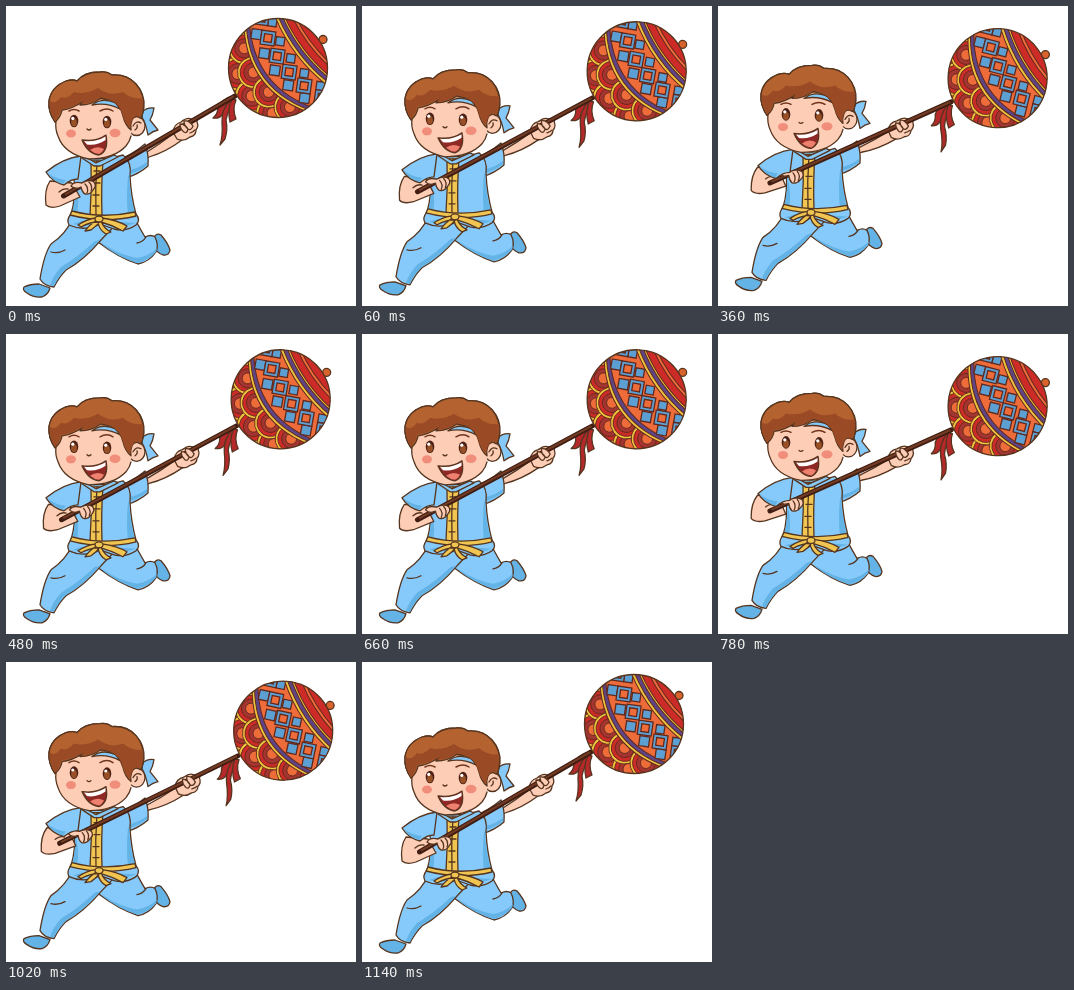
An HTML page for the animation above (1.2 s loop, 350x300 px).

```html
<!DOCTYPE html>
<html lang="en">
<head>
<meta charset="utf-8">
<title>Running boy with a ball on a stick</title>
<style>
  html, body { margin: 0; width: 100%; height: 100%; overflow: hidden; background: #fff; }
  svg { display: block; width: 100vw; height: 100vh; }
  .line { stroke: #55351f; stroke-width: 1.3; stroke-linejoin: round; stroke-linecap: round; }
  .cloth { fill: #86cafb; }
  .shade { fill: #64b3e6; }
  .skin { fill: #fecdb5; }
  .gold { fill: #f0c552; }
  .red { fill: #b5292b; }
  .hair { fill: #b4622f; }
  .none { fill: none; }
</style>
</head>
<body>
<svg viewBox="0 0 350 300" preserveAspectRatio="none">
  <defs><clipPath id="round"><circle r="49.5"/></clipPath></defs>

  <g id="armBack">
    <path class="skin line" d="M132 158 L141 146 Q154 138 168 127 L176 134 Q160 146 143 151Z"/>
    <path class="skin line" d="M167 126 Q168 118 175 116 Q181 111 185 113 Q192 111 191 116 Q193 120 190 124 Q190 130 184 131 Q178 136 171 133Z"/>
  </g>

  <g id="sleeve">
    <path class="cloth line" d="M108 156 Q126 149 139 138 Q143 148 142 160 Q133 168 120 172Z"/>
    <path class="shade" d="M124 168 Q134 165 141 159 L141 156 Q133 162 124 164Z"/>
  </g>

  <g id="body">
    <!-- legs and shoes -->
    <path class="shade line" d="M147 233 Q150 226 155 229 Q162 237 164 244 Q163 250 157 249 Q151 247 147 240Z"/>
    <path class="cloth line" d="M88 214 L130 215 Q136 226 139 231 Q145 228 149 231 Q153 239 150 246 Q143 256 132 258 Q113 252 92 236Z"/>
    <path class="shade" d="M97 238 Q114 249 131 252 Q143 250 151 242 L150 246 Q142 255 131 257 Q112 251 97 239Z"/>
    <path class="shade line" d="M33 278 Q24 278 18 281 Q16 284 21 287 Q28 292 36 291 Q42 289 44 282Z"/>
    <path class="cloth line" d="M67 212 Q60 228 45 238 Q38 248 34 273 Q38 280 48 281 Q53 271 60 264 Q78 254 95 234 L114 214Z"/>
    <path class="shade" d="M48 280 Q53 270 60 263 Q78 253 94 234 L89 235 Q72 251 55 261 Q47 270 44 279Z"/>
    <path class="none line" d="M45 246 Q52 248 59 244 M131 237 Q137 236 140 231"/>

    <!-- shirt -->
    <path class="cloth line" d="M74 150 Q92 156 117 149 Q126 156 124 170 Q125 190 130 208 Q135 214 130 219 Q120 226 108 223 L94 218 Q78 226 63 219 Q60 214 65 208 Q70 192 68 172 L66 158Z"/>
    <path class="shade" d="M122 170 Q120 192 122 209 L129 208 Q124 190 123 170Z M67 218 Q80 222 92 217 L76 215Z M98 217 Q116 223 130 217 L114 216Z"/>
    <path class="shade" d="M69 178 Q74 192 71 208 L66 207 Q70 193 69 178Z"/>
    <path class="gold line" d="M85 155 L97 155 Q95 180 96 210 L84 210 Q86 182 85 155Z"/>
    <path class="none line" d="M91 155 Q89 182 90 210 M88 165h6 M88 177h6 M87 189h6 M87 200h6"/>
    <path class="cloth line" d="M78 150 L90 157 L108 149 L112 151 L94 160 L88 160 L76 152Z"/>

    <!-- sash -->
    <path class="gold line" d="M66 205 Q96 213 129 206 L130 210 Q98 218 64 209Z"/>
    <path class="gold line" d="M90 212 Q81 213 72 219 L75 221 Q84 216 92 216Z M96 212 Q111 214 121 220 L117 225 Q106 219 95 216Z M91 214 Q83 219 79 225 L85 224 Q91 220 94 215Z M95 215 Q98 223 105 226 L100 228 Q93 224 92 216Z"/>
    <ellipse class="gold line" cx="93" cy="213" rx="4" ry="3"/>
  </g>

  <g id="forearm">
    <path class="skin line" d="M44 175 Q38 184 40 199 Q44 203 54 200 L74 191 L66 177Z"/>
    <path class="none line" d="M53 186 Q57 182 62 183"/>
  </g>

  <g id="pole">
    <g id="ribbon">
      <path class="red line" d="M227 90 Q216 93 212 101 Q212 108 207 112 Q213 113 216 109 Q220 101 228 95Z"/>
      <path class="red line" d="M226 92 Q215 103 216 116 Q217 130 214 139 L219 133 Q222 124 220 114 Q222 103 229 95Z"/>
      <path class="red line" d="M226 93 Q221 103 224 116 L230 113 Q226 103 230 94Z"/>
    </g>
    <path d="M57.500 190 L229 90" stroke="#3f1d12" stroke-width="5" stroke-linecap="round"/>
    <path d="M59 188.700 L228 90.200" stroke="#743c24" stroke-width="2"/>
    <g id="ball" transform="translate(272 62)">
      <circle class="line" cx="45" cy="-28.500" r="4" fill="#d9632d"/>
      <circle r="49.500" fill="#ea6a31"/>
      <g clip-path="url(#round)"><g id="pattern" transform="rotate(-37)"></g></g>
      <circle class="none line" r="49.500"/>
    </g>
  </g>

  <g id="fist">
    <path class="skin line" d="M65 180 Q68 175 76 177 Q83 173 88 176 Q91 180 87 184 Q84 189 79 188 Q76 186 75 181 Q69 184 65 180Z"/>
    <path class="none line" d="M79 178 Q83 182 81 187 M83 176 Q87 180 85 185"/>
  </g>

  <g id="fingers">
    <path class="skin line" d="M178 115 Q183 114 187 120 Q185 125 182 123 Q178 120 178 115Z M174 118 Q179 118 182 123 Q181 128 178 126 Q174 123 174 118Z"/>
    <path class="none line" d="M184 127 Q187 126 189 124"/>
  </g>

  <g id="front">
    <path class="cloth line" d="M75 150 Q57 152 40 166 Q46 176 58 179 Q65 173 72 173Z"/>
    <path class="shade" d="M42 167 Q50 173 60 174 L57 178 Q47 175 42 167Z"/>

    <!-- head -->
    <path class="cloth line" d="M136 106 Q141 101 148 102 Q147 109 144 114 L152 124 Q147 125 142 129 Q140 118 136 111Z"/>
    <path class="hair line" d="M49 116 Q42 106 43 95 Q45 81 60 75 Q67 73 71 75 Q78 66 94 66 Q101 65 106 69 Q121 68 130 78 Q139 88 138 101 Q137 110 132 118 L110 126Z"/>
    <ellipse class="skin line" cx="130.500" cy="120" rx="8.500" ry="9.500"/>
    <path class="none line" d="M127 120 Q130 114 135 117 M129 124 Q132 122 131 119"/>
    <path class="skin" d="M51 105 Q48 119 52 130 Q58 148 83 153 Q108 153 120 140 Q127 132 125 118 Q124 105 112 95 L72 92Z"/>
    <path class="none line" d="M50 115 Q49 123 52 130 Q58 148 83 153 Q108 153 120 140 Q124 135 125 130"/>
    <path class="cloth line" d="M86 99 Q96 91 110 97 L114 103 Q101 96 86 99Z"/>
    <path class="hair line" d="M49 116 Q42 106 43 95 Q45 81 60 75 Q67 73 71 75 Q78 66 94 66 Q101 65 106 69 Q121 68 130 78 Q139 88 137 103 Q137 110 134 112 Q129 108 126 114 Q124 119 125 124 Q119 119 117 110 Q114 98 104 94 L95 92 Q86 99 74 99 Q77 97 78 95 Q66 103 56 104 Q55 111 49 116Z"/>
    <path fill="#9a4a25" d="M49 115 Q43 106 44 95 Q49 99 55 91 Q61 94 68 86 Q80 89 92 82 Q104 91 117 86 Q126 94 137 92 Q138 104 134 111 Q129 108 126 114 L124 121 Q119 118 117 110 Q114 98 104 94 L95 91 Q86 98 75 98 L78 94 Q66 102 55 103 Q54 110 49 115Z"/>
    <path d="M63 105 Q68 102 73 105 M94 105 Q101 101 107 105" fill="none" stroke="#6e351c" stroke-width="1.500" stroke-linecap="round"/>
    <g fill="#f18d7b"><ellipse cx="65" cy="127.500" rx="5" ry="4"/><ellipse cx="109" cy="127" rx="5.500" ry="4.200"/></g>
    <g id="eyes"></g>
    <path class="none line" d="M81 123 Q83 125 85 123"/>
    <path class="line" fill="#8f2925" d="M76 134 Q90 136 100 129 Q103 145 93 149 Q82 148 76 134Z"/>
    <path fill="#fff" d="M78 135 Q90 136.500 99.500 130.500 L99.500 134 Q91 140 81 138.500Z"/>
    <path fill="#ee806f" d="M84 144 Q91 139 98 143 Q96 147 93 148 Q88 147.500 84 144Z"/>
  </g>
</svg>
<script>
const $ = id => document.getElementById(id);
const NS = 'http://www.w3.org/2000/svg';

function add(parent, tag, attrs) {
  const el = document.createElementNS(NS, tag);
  for (const name in attrs) el.setAttribute(name, attrs[name]);
  parent.append(el);
}

const color = { orange: '#ee6c3a', red: '#cd2b27', wine: '#a33430', yellow: '#edc23c', purple: '#5d4588', blue: '#5c9fd3', ink: '#60291d' };
const pattern = $('pattern');
const bowed = (x, y, bow) => x + bow * y * y / 3600;

function scallops(x, size, offset) {
  const rings = [[1, color.yellow], [.84, color.red], [.6, color.wine], [.34, color.orange]];
  for (let y = offset - 50; y <= 55; y += size * 1.55)
    for (const [scale, fill] of rings)
      add(pattern, 'circle', { cx: bowed(x, y, 22), cy: y, r: size * scale, fill, stroke: color.ink, 'stroke-width': .8 });
}

// Each band covers everything between its bowed edge and the knob.
function band(x, bow, fill) {
  add(pattern, 'path', { d: `M${x + bow} -60Q${x - bow} 0 ${x + bow} 60H75V-60Z`, fill, stroke: color.ink, 'stroke-width': 1 });
}

function diamond(x, y, size, fill) {
  const cx = bowed(x, y, 16);
  add(pattern, 'path', { d: `M${cx - size} ${y}L${cx} ${y - size}L${cx + size} ${y}L${cx} ${y + size}Z`, fill, stroke: color.ink, 'stroke-width': 1.3 });
}

function paintBall() {
  scallops(-38, 17, 4);
  scallops(-23, 16, 14);
  band(-20, 22, color.yellow);
  band(-17, 22, color.purple);
  band(-13, 22, color.orange);
  for (let y = -50; y <= 50; y += 20) {
    diamond(-4, y + 10, 7, color.blue);
    diamond(16, y + 10, 6, color.blue);
    diamond(6, y, 10, color.blue);
    diamond(6, y, 5.5, color.orange);
  }
  const stripes = [[23, color.yellow], [26, color.purple], [30, color.yellow], [32, color.red], [39, color.orange], [42, color.red]];
  stripes.forEach(([x, fill]) => band(x, 11, fill));
}

function paintEyes() {
  for (const [x, y] of [[68, 115], [101, 116]]) {
    add($('eyes'), 'ellipse', { cx: x, cy: y, rx: 4.3, ry: 6.3, fill: '#4b2115' });
    add($('eyes'), 'ellipse', { cx: x, cy: y + 1.5, rx: 2.9, ry: 4, fill: '#985026' });
    add($('eyes'), 'circle', { cx: x - 1.2, cy: y - 2.6, r: 1.6, fill: '#fff' });
  }
}

const move = (id, value) => $(id).setAttribute('transform', value);

function draw(time) {
  const step = Math.floor(time % 600 / 60);
  const level = Math.min(step, 9 - step);
  const swing = `rotate(${2.05 * level} 172 128)`;
  const slide = (x, y) => `translate(${x * level} ${y * level})`;

  move('body', slide(0, -2.2));
  move('front', slide(0, -2.2));
  move('sleeve', slide(0, -1));
  move('pole', slide(.15, -.15) + swing);
  move('ball', `translate(${272 + .2 * level} ${62 - .2 * level})`);
  move('ribbon', `rotate(${-4 * level} 228 91)`);
  move('forearm', slide(0, 0) + swing);
  move('fist', slide(.3, -.3) + swing);
  move('armBack', slide(.9, -.5) + swing);
  move('fingers', slide(.9, -.5) + swing);
}

paintBall();
paintEyes();
const start = performance.now();
function tick() {
  draw(performance.now() - start);
  requestAnimationFrame(tick);
}
tick();
</script>
</body>
</html>
```
